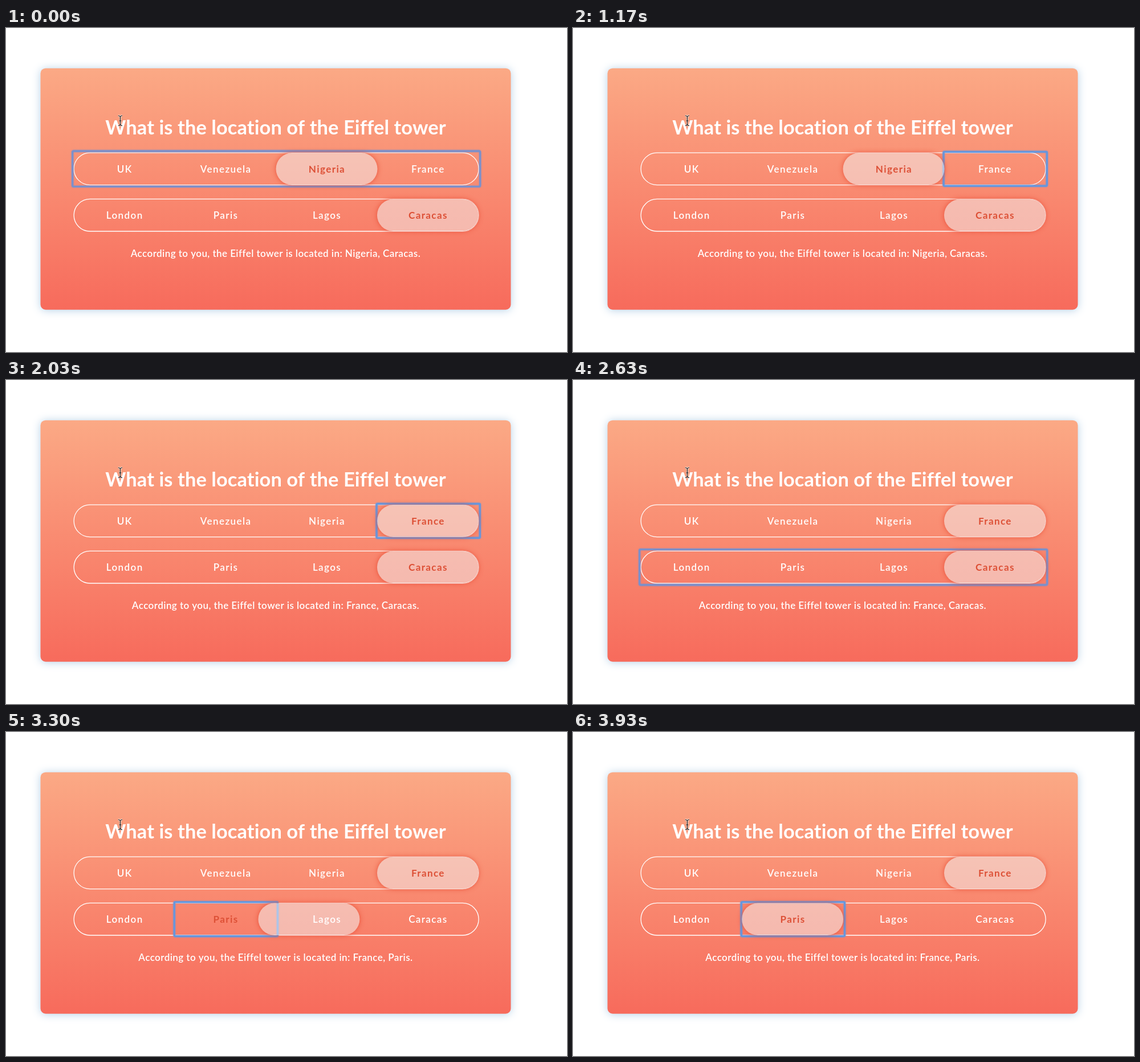
Recreate the animation shown at these times as an HTML page with a canvas. Size 984 by 569 pixels, loop 3960 ms.

```html
<!DOCTYPE html>
<html lang="en">
<head>
<meta charset="utf-8">
<title>Quiz</title>
<style>
  html, body { margin: 0; width: 100%; height: 100%; overflow: hidden; background: #fff; }
  canvas { display: block; width: 984px; height: 569px; }
</style>
</head>
<body>
<canvas id="stage"></canvas>
<script>
const W = 984, H = 569, LOOP = 3960;
const canvas = document.getElementById('stage');
const ctx = canvas.getContext('2d');
const dpr = window.devicePixelRatio || 1;
canvas.width = W * dpr;
canvas.height = H * dpr;

const FONT = 'Lato, "Open Sans", sans-serif';
const LEFT = 118.7, STEP = 177.4, ROW_H = 57, SLIDE = 400;
const cellX = i => LEFT + STEP * i;

const rows = [
  { y: 218.9, labels: ['UK', 'Venezuela', 'Nigeria', 'France'], from: 2, to: 3, at: 1346 },
  { y: 300.2, labels: ['London', 'Paris', 'Lagos', 'Caracas'], from: 3, to: 1, at: 3165 }
];

// keyboard focus: start time, row, option (-1 is the whole group)
const focusSteps = [
  [0, 0, -1], [220, 0, 0], [490, 0, 1], [800, 0, 2], [1150, 0, 3],
  [2400, 1, -1], [2780, 1, 0], [2990, 1, 1]
];

// CSS "ease": cubic-bezier(.25, .1, .25, 1)
function ease(x) {
  if (x <= 0) return 0;
  if (x >= 1) return 1;
  const bez = (a, b, u) => 3 * a * u * (1 - u) ** 2 + 3 * b * u * u * (1 - u) + u ** 3;
  let lo = 0, hi = 1;
  for (let i = 0; i < 24; i++) {
    const mid = (lo + hi) / 2;
    if (bez(0.25, 0.25, mid) < x) lo = mid; else hi = mid;
  }
  return bez(0.1, 1, lo);
}

const chosen = (row, t) => t < row.at ? row.from : row.to;

function roundRect(x, y, w, h, r) {
  ctx.beginPath();
  ctx.roundRect(x, y, w, h, r);
}

function shadow(color, blur, dy = 0) {
  ctx.shadowColor = color;
  ctx.shadowBlur = blur * dpr;
  ctx.shadowOffsetY = dy * dpr;
}

function text(str, x, y, size, weight, spacing, color) {
  ctx.font = `${weight} ${size}px ${FONT}`;
  ctx.letterSpacing = spacing + 'px';
  ctx.textAlign = 'center';
  ctx.fillStyle = color;
  ctx.fillText(str, x + spacing / 2, y);
}

function drawCard() {
  const grad = ctx.createLinearGradient(0, 71, 0, 494);
  grad.addColorStop(0, '#fba985');
  grad.addColorStop(1, '#f76b5c');
  ctx.save();
  shadow('rgba(165,198,226,.8)', 15, 1);
  ctx.fillStyle = grad;
  roundRect(60.5, 70.7, 825, 424, 9);
  ctx.fill();
  ctx.restore();
}

function drawRing(row, option) {
  const group = option < 0;
  const color = group ? '#7b90cb' : '#6796dc';
  ctx.save();
  shadow(color, 2.5);
  ctx.strokeStyle = color;
  ctx.lineWidth = 3.2;
  if (group) roundRect(116.6, row.y - 2.7, 715, 62.3, 2);
  else roundRect(cellX(option) - 0.9, row.y - 1.6, 181.3, 60, 1.5);
  ctx.stroke();
  ctx.restore();
}

function drawPill(row, t) {
  const p = ease((t - row.at) / SLIDE);
  const box = [cellX(row.from + (row.to - row.from) * p), row.y + 0.4, 178, ROW_H - 0.6, 28.2];

  // the shadow shows only outside the translucent pill
  ctx.save();
  ctx.beginPath();
  ctx.rect(0, 0, W, H);
  ctx.roundRect(...box);
  ctx.clip('evenodd');
  shadow('rgba(232,72,48,.85)', 8);
  ctx.fillStyle = '#ee6a4e';
  roundRect(...box);
  ctx.fill();
  ctx.restore();

  ctx.fillStyle = 'rgba(243,243,243,.5)';
  roundRect(...box);
  ctx.fill();
}

function drawRow(row, t, option) {
  ctx.strokeStyle = '#fff';
  ctx.lineWidth = 1.3;
  roundRect(LEFT + 0.4, row.y + 0.2, 710, ROW_H - 0.4, 28.3);
  ctx.stroke();
  if (option !== null) drawRing(row, option);
  drawPill(row, t);
  row.labels.forEach((label, i) => {
    const on = i === chosen(row, t);
    text(label, cellX(i) + STEP / 2 + 0.1, row.y + 34.6, 17, on ? 700 : 600, 1.4, on ? '#dd5036' : '#fff');
  });
}

function drawCursor() {
  ctx.beginPath();
  ctx.moveTo(196.8, 154);
  ctx.quadraticCurveTo(200.4, 154, 200.4, 157);
  ctx.quadraticCurveTo(200.4, 154, 204, 154);
  ctx.moveTo(200.4, 156);
  ctx.lineTo(200.4, 169.5);
  ctx.moveTo(196.8, 171.5);
  ctx.quadraticCurveTo(200.4, 171.5, 200.4, 168.5);
  ctx.quadraticCurveTo(200.4, 171.5, 204, 171.5);
  ctx.moveTo(198.4, 163);
  ctx.lineTo(202.4, 163);
  ctx.strokeStyle = 'rgba(255,255,255,.75)';
  ctx.lineWidth = 2.8;
  ctx.stroke();
  ctx.strokeStyle = '#151010';
  ctx.lineWidth = 1.2;
  ctx.stroke();
}

function draw(t) {
  ctx.setTransform(dpr, 0, 0, dpr, 0, 0);
  ctx.fillStyle = '#fff';
  ctx.fillRect(0, 0, W, H);
  drawCard();
  text('What is the location of the Eiffel tower', 473, 187, 34.4, 700, 0.1, '#fff');

  const [, focusRow, option] = focusSteps.filter(s => s[0] <= t).pop();
  rows.forEach((row, i) => drawRow(row, t, i === focusRow ? option : null));

  const answer = rows.map(row => row.labels[chosen(row, t)]).join(', ');
  text(`According to you, the Eiffel tower is located in: ${answer}.`, 472.7, 402, 17, 600, 0.44, '#fff');
  drawCursor();
}

const start = performance.now();
function tick() {
  draw((performance.now() - start) % LOOP);
  requestAnimationFrame(tick);
}
tick();
</script>
</body>
</html>
```
